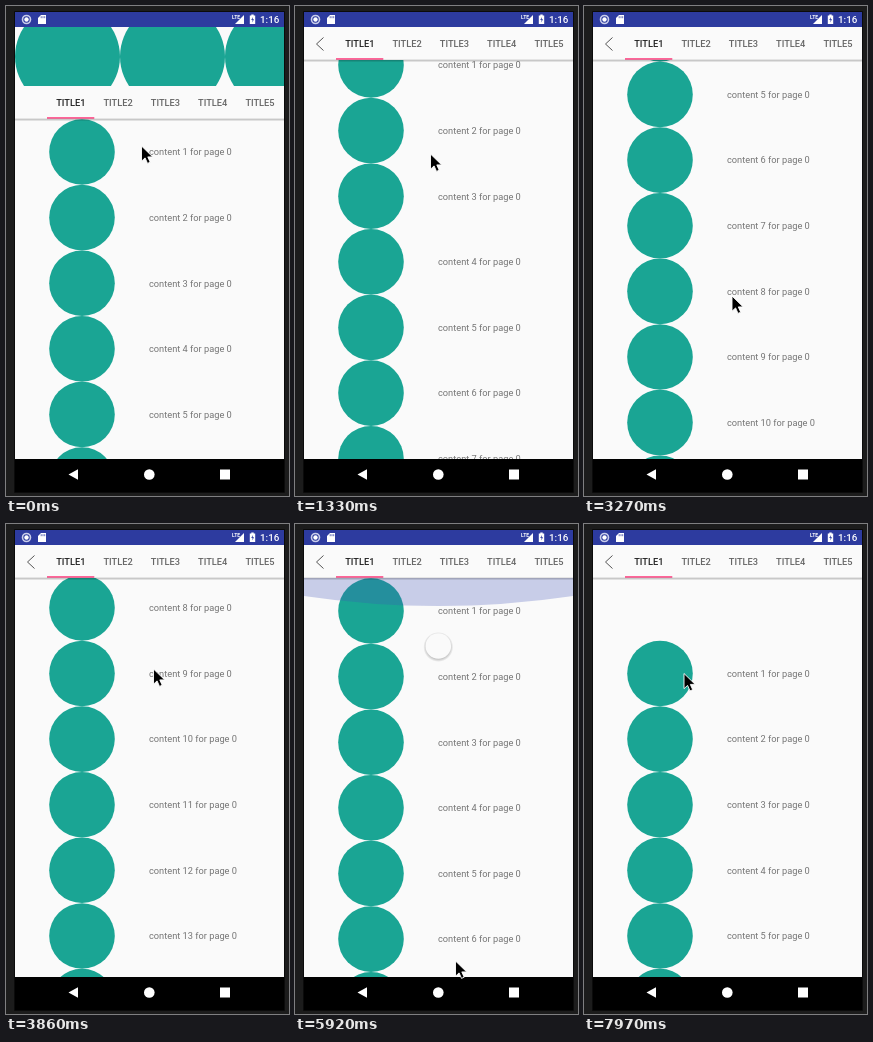
Recreate the animation shown at these times as an HTML page. Size 283 by 490 pixels, loop 8000 ms.

```html
<!DOCTYPE html>
<html lang="en">
<head>
<meta charset="utf-8">
<title>Collapsing tab list</title>
<style>
  html, body { margin: 0; width: 100%; height: 100%; overflow: hidden; background: #1b1b1b; }
  svg { display: block; }
  text { font-family: Roboto, "Open Sans", sans-serif; font-size: 9.25px; }
  .tab { font-weight: 500; fill: #666; text-anchor: middle; }
  .tab.on { fill: #212121; }
  .row { fill: #757575; }
  .icon { fill: #1aa594; }
</style>
</head>
<body>
<svg id="stage" width="283" height="490" viewBox="0 0 283 490">
  <defs>
    <linearGradient id="shade" x2="0" y2="1">
      <stop offset="0" stop-opacity=".28"/>
      <stop offset="1" stop-opacity="0"/>
    </linearGradient>
    <radialGradient id="halo">
      <stop offset=".8" stop-opacity=".22"/>
      <stop offset="1" stop-opacity="0"/>
    </radialGradient>
  </defs>

  <rect x="9" y="21" width="269" height="432" fill="#fafafa"/>
  <g id="list"></g>
  <path id="glow" fill="#3f51b5" fill-opacity=".27"/>
  <g id="spinner">
    <circle cy="1" r="15" fill="url(#halo)"/>
    <circle r="12.8" fill="#fafafa"/>
  </g>

  <g id="bar">
    <rect x="9" y="21" width="269" height="92" fill="#fafafa"/>
    <svg id="banner" x="9" y="21" width="269" height="59"></svg>
    <g id="tabs"></g>
    <rect x="41" y="111.2" width="47.3" height="1.5" fill="#ff4081"/>
    <rect x="9" y="112.7" width="269" height="2.8" fill="url(#shade)"/>
  </g>
  <path id="back" d="M28.5 31.5 21.5 38 28.5 44.5" fill="none" stroke="#555" stroke-width="1"/>

  <rect x="9" y="6" width="269" height="15" fill="#2d3b9f"/>
  <g fill="#fff">
    <circle cx="20.5" cy="13.5" r="4" fill="none" stroke="#c9cdea" stroke-width="1.6"/>
    <circle cx="20.5" cy="13.5" r="2.2"/>
    <path d="M35 9h5v9h-8v-6z"/>
    <path d="M35.2 10.2v2M37 10.2v2M38.7 10.2v2" stroke="#2d3b9f" stroke-width=".7"/>
    <text x="226" y="12.8" style="font-size:5px;font-weight:700">LTE</text>
    <path d="M238 9v9h-9z"/>
    <path d="M243.8 9.5h1.5v-1h2.4v1h1.5v8.5h-5.4z"/>
    <path d="M247 11l-1.8 3h1.4l-.5 2.6 2-3.4h-1.4z" fill="#2d3b9f"/>
    <text x="254" y="17" style="font-size:9.8px;font-weight:500">1:16</text>
  </g>

  <path d="M0 0H283V490H0ZM9 6V486H278V6Z" fill="#1c1c1c" fill-rule="evenodd"/>
  <path d="M8.5 5.5H278.5V486.5H8.5Z" fill="none" stroke="#0b0b0b"/>
  <rect x="9" y="453" width="269" height="33"/>
  <g fill="#fff">
    <path d="M62.5 468.5 72 463.2V473.8Z"/>
    <circle cx="143.3" cy="468.5" r="5.3"/>
    <rect x="214" y="463.5" width="10" height="10"/>
  </g>
  <path id="cursor" d="M0 0V15.2L3.6 11.9 6 17.4 8.7 16.2 6.3 10.9H11.2Z" stroke="#fff" stroke-width=".9"/>
</svg>
<script>
const LOOP = 8000, STEP = 147.6, ROW = 65.62, COLLAPSE = 59;
const NS = "http://www.w3.org/2000/svg";
const $ = id => document.getElementById(id);

function add(parent, tag, attrs, label = "") {
  const el = document.createElementNS(NS, tag);
  for (const key in attrs) el.setAttribute(key, attrs[key]);
  el.textContent = label;
  parent.append(el);
}

for (let i = 0; i < 3; i++)
  add($("banner"), "circle", { class: "icon", cx: 52.5 + 105 * i, cy: 29.5, r: 52.5 });

for (let i = 0; i < 5; i++)
  add($("tabs"), "text", { class: i ? "tab" : "tab on", x: 64.8 + 47.3 * i, y: 100.2 }, `TITLE${i + 1}`);

for (let i = 0; i < 24; i++) {
  add($("list"), "circle", { class: "icon", cx: 76, cy: ROW * i, r: 32.8 });
  add($("list"), "text", { class: "row", x: 143, y: ROW * i + 3.3 }, `content ${i + 1} for page 0`);
}

// Each key is [tick, ...values]; values are linear between keys.
const scrollKeys = [
  [3, 0], [4, 12], [7, 60], [9, 87], [11, 94], [13, 94], [16, 204], [18, 276],
  [21, 276], [22, 320], [23, 390], [24, 390], [25, 440], [26, 521.5], [31, 928],
  [32, 970], [33, 990], [35, 990], [36, 930], [37, 700], [38, 350], [39, 100],
  [40, 59], [51, 59], [52, 48], [53, 22], [54, -3.5]
];
const cursorKeys = [
  [0, 135.5, 140], [2, 127.5, 246], [3, 127.5, 246], [9, 135.5, 148], [11, 135.5, 148],
  [13, 130.5, 335], [16, 130.5, 233], [18, 146, 150], [21, 146, 150], [22, 148, 290],
  [23, 148, 220], [24, 148, 220], [25, 147.5, 145], [35, 147.5, 145], [36, 149, 190],
  [38, 156, 370], [39, 159.5, 430], [40, 160.5, 437], [43, 160.5, 437],
  [51, 131, 77], [52, 108, 97], [54, 100, 149.5]
];
const glowKeys = [[38, 0], [39, .6], [40, 1], [41, .5], [42, 0]];
const spinnerKeys = [[38, 60, 0], [39, 98, 1], [40, 122, 1], [42, 90, 1], [46, 90, 1], [48, 90, 0]];

function track(keys, tick) {
  const next = keys.findIndex(key => key[0] > tick);
  if (next === 0) return keys[0].slice(1);
  if (next < 0) return keys[keys.length - 1].slice(1);
  const a = keys[next - 1], b = keys[next];
  const p = (tick - a[0]) / (b[0] - a[0]);
  return a.slice(1).map((v, i) => v + (b[i + 1] - v) * p);
}

const move = (id, x, y, scale = 1) =>
  $(id).setAttribute("transform", `translate(${x} ${y}) scale(${scale})`);

function draw(time) {
  const tick = Math.floor((time % LOOP + 6) / STEP);
  const [scroll] = track(scrollKeys, tick);
  const [x, y] = track(cursorKeys, tick);
  const [glow] = track(glowKeys, tick);
  const [spinY, spinScale] = track(spinnerKeys, tick);
  const collapsed = tick > 11 ? COLLAPSE : Math.min(COLLAPSE, scroll);

  move("list", 0, 146 - scroll);
  move("bar", 0, -collapsed);
  move("cursor", x, y);
  move("spinner", 143.3, spinY, spinScale);
  $("back").style.opacity = collapsed === COLLAPSE ? 1 : 0;
  $("glow").setAttribute("d", `M9 53V${53 + 19 * glow}Q143.5 ${53 + 39 * glow} 278 ${53 + 19 * glow}V53Z`);
  $("glow").style.opacity = glow;
}

const start = performance.now();
function loop() {
  draw(performance.now() - start);
  requestAnimationFrame(loop);
}
loop();
</script>
</body>
</html>
```
